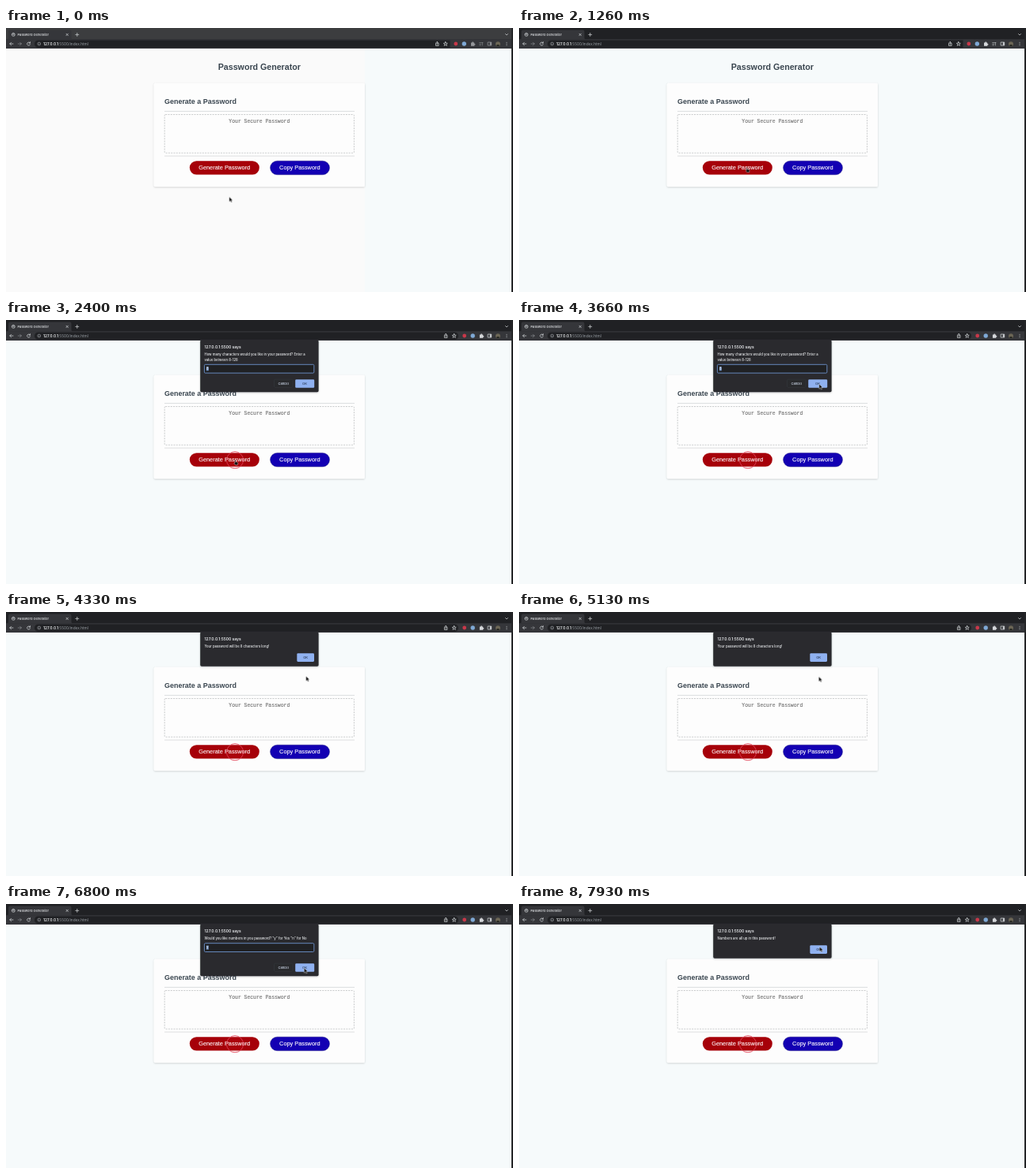
Write an HTML page that moves like this. It is 640 px wide and 334 px high and loops after 8000 ms.

```html
<!DOCTYPE html>
<html lang="en">
<head>
<meta charset="utf-8">
<title>Password Generator</title>
<style>
html, body { margin: 0; width: 100%; height: 100%; overflow: hidden; background: #f6fafb; }
svg { display: block; width: 100%; height: 100%; }
text { font-family: Inter, "Open Sans", sans-serif; white-space: pre; }
.page text { font-family: "Liberation Sans", Arial, sans-serif; text-anchor: middle; }
.page .head { font-weight: bold; fill: #3a4650; }
.page .mono { font: 6.42px "Liberation Mono", monospace; fill: #707070; stroke: #707070; stroke-width: .12; }
.page .label { font-size: 7.35px; fill: #fff; stroke: #fff; stroke-width: .12; }
.says { font-size: 4.95px; font-weight: 600; fill: #e8eaed; }
.msg { font-size: 4.24px; font-weight: 500; fill: #eceef0; }
.btn { font-size: 4px; font-weight: 500; text-anchor: middle; }
.line { fill: none; stroke: #c6c9cc; stroke-width: .8; stroke-linecap: round; stroke-linejoin: round; }

/* Hard switches */
.stale, .wide, .slim, .d1, .d2, .d3, .d4, .hover, .arrow, .hand {
  animation: 8s step-end infinite;
}
.stale { animation-name: stale; }
.wide { animation-name: wide; }
.slim { animation-name: slim; }
.d1 { animation-name: d1; }
.d2 { animation-name: d2; }
.d3 { animation-name: d3; }
.d4 { animation-name: d4; }
.hover { animation-name: hover; }
.arrow { animation-name: arrow; }
.hand { animation-name: hand; }
@keyframes stale { 0% { opacity: 1 } 13%, 100% { opacity: 0 } }
@keyframes wide { 0% { opacity: 1 } 25%, 100% { opacity: 0 } }
@keyframes slim { 0% { opacity: 0 } 25%, 100% { opacity: 1 } }
@keyframes d1 { 0% { opacity: 0 } 26% { opacity: 1 } 53%, 100% { opacity: 0 } }
@keyframes d2 { 0% { opacity: 0 } 53% { opacity: 1 } 76%, 100% { opacity: 0 } }
@keyframes d3 { 0% { opacity: 0 } 76% { opacity: 1 } 89%, 100% { opacity: 0 } }
@keyframes d4 { 0% { opacity: 0 } 89%, 100% { opacity: 1 } }
@keyframes hover {
  0% { opacity: 0 } 40.5% { opacity: .12 } 53% { opacity: 0 }
  71.5% { opacity: .12 } 76% { opacity: 0 } 80.5% { opacity: .12 }
  89% { opacity: 0 } 95%, 100% { opacity: .12 }
}
@keyframes arrow { 0% { opacity: 1 } 6.5% { opacity: 0 } 35%, 100% { opacity: 1 } }
@keyframes hand { 0% { opacity: 0 } 6.5% { opacity: 1 } 35%, 100% { opacity: 0 } }

.cursor { animation: move 8s ease-in-out infinite; }
@keyframes move {
  0%, 1% { transform: translate(281.7px, 213.6px) }
  9.5%, 16% { transform: translate(287.2px, 176.2px) }
  21%, 33.5% { transform: translate(288.9px, 177px) }
  42%, 53% { transform: translate(378.8px, 80.9px) }
  56%, 67.5% { transform: translate(378.4px, 81.7px) }
  73%, 77% { transform: translate(378px, 54.8px) }
  82.5%, 90% { transform: translate(376.4px, 80.9px) }
  97%, 100% { transform: translate(379.4px, 54px) }
}
</style>
</head>
<body>
<svg viewBox="0 0 640 334" preserveAspectRatio="none">
  <defs>
    <filter id="shadow" x="-10%" y="-10%" width="120%" height="125%">
      <feDropShadow dx="0" dy=".8" stdDeviation="1.1" flood-color="#000" flood-opacity=".18"/>
    </filter>
    <filter id="deep" x="-10%" y="-20%" width="120%" height="150%">
      <feDropShadow dx="0" dy=".6" stdDeviation="1.1" flood-color="#000" flood-opacity=".25"/>
    </filter>
    <g id="field">
      <rect x="250.4" y="56.3" width="138.4" height="10.8" rx="1.2" fill="#202124" stroke="#6c92cc" stroke-width=".9"/>
      <rect x="252.9" y="59.2" width="2.9" height="5" fill="#6f90c0"/>
    </g>
    <g id="choices">
      <rect x="338.5" y="75.2" width="23.2" height="10.2" rx="1.3" fill="#292a2d" stroke="#3c4045" stroke-width=".4"/>
      <text class="btn" x="350.1" y="81.6" fill="#d5e0f2">Cancel</text>
      <rect x="365.2" y="75.2" width="24" height="10.6" rx="1.3" fill="#8fb1f0"/>
      <text class="btn" x="377" y="81.7" fill="#26354f">OK</text>
      <rect class="hover" x="365.2" y="75.2" width="24" height="10.6" rx="1.3" fill="#123"/>
    </g>
    <g id="confirm">
      <rect x="367.3" y="52.3" width="21.7" height="10.6" rx="1.3" fill="#8fb1f0"/>
      <text class="btn" x="378.1" y="59" fill="#26354f">OK</text>
      <rect class="hover" x="367.3" y="52.3" width="21.7" height="10.6" rx="1.3" fill="#123"/>
    </g>
    <g id="tall">
      <rect x="245.2" y="25.3" width="149.4" height="66" rx="1.8" fill="#292a2d" filter="url(#deep)"/>
      <text class="says" x="250.5" y="35.5">127.0.0.1:5500 says</text>
    </g>
    <g id="short">
      <rect x="245.2" y="25.3" width="149.4" height="43.5" rx="1.8" fill="#292a2d" filter="url(#deep)"/>
      <text class="says" x="250.5" y="35.5">127.0.0.1:5500 says</text>
    </g>
    <path id="share" class="line" d="M-1.1 -.7H-1.8V2.4H1.8V-.7H1.1M0 1V-2.6M-1.1 -1.6L0 -2.7L1.1 -1.6"/>
    <path id="star" class="line" d="M0 -2.5L.7 -.8L2.5 -.7L1.1 .5L1.6 2.3L0 1.3L-1.6 2.3L-1.1 .5L-2.5 -.7L-.7 -.8Z"/>
    <g id="tools">
      <use href="#share" x="-34" y="20"/>
      <use href="#star" x="-23.5" y="20"/>
      <circle cx="-10.5" cy="20" r="2.4" fill="#c9384a"/>
      <circle cx="0" cy="20" r="2.7" fill="#7fa9d6"/>
      <path d="M8.7 18.5H10.2V17.4H11.7V18.5H13V20H14V21.4H13V22.8H8.7Z" fill="#d5d7da"/>
    </g>
  </defs>

  <!-- Page -->
  <rect width="640" height="334" fill="#f6fafb"/>
  <rect class="stale" y="26" width="453" height="308" fill="#fafafa"/>
  <g class="page">
    <text class="head" x="319.8" y="53.2" font-size="10.65">Password Generator</text>
    <rect x="186.7" y="69.7" width="266.2" height="131" rx="1.7" fill="#fdfdfd" filter="url(#shadow)"/>
    <text class="head" x="245.5" y="95.6" font-size="8.95">Generate a Password</text>
    <path d="M200 105.4H440M200 162H440" stroke="#cfd1d3" stroke-width=".7"/>
    <rect x="200.2" y="109.5" width="239.2" height="48.6" rx="1" fill="none" stroke="#bdbfc1" stroke-width=".8" stroke-dasharray="2 1.3"/>
    <text class="mono" x="319.8" y="120.3">Your Secure Password</text>
    <rect x="231.8" y="168.2" width="88" height="17.2" rx="8.6" fill="#a60009"/>
    <text class="label" x="275.7" y="179.3">Generate Password</text>
    <rect x="333.6" y="168.2" width="74.8" height="17.4" rx="8.7" fill="#1300b3" stroke="#0c0080" stroke-width=".5"/>
    <text class="label" x="370.8" y="179.3">Copy Password</text>
  </g>
  <circle class="slim" cx="289" cy="177.2" r="10.6" fill="#f33" fill-opacity=".06" stroke="#e2485c" stroke-opacity=".85"/>

  <!-- Browser bar -->
  <rect width="640" height="26" fill="#202124"/>
  <rect class="stale" width="640" height="14.4" fill="#3c3d3f"/>
  <path d="M1 14.4Q3 14.4 3 12.2V4.5Q3 2.4 5 2.4H80.5Q82.5 2.4 82.5 4.5V12.2Q82.5 14.4 84.5 14.4Z" fill="#35363a"/>
  <rect y="14.2" width="640" height="11.8" fill="#35363a"/>
  <rect x="36" y="15.5" width="535" height="9.3" rx="4.6" fill="#202124"/>
  <circle cx="9.3" cy="8.4" r="2" fill="none" stroke="#c6c9cc" stroke-width=".7"/>
  <path class="line" d="M7.6 8H9.5L10.3 9.4M9 6.6L10.5 7.4"/>
  <text x="14.5" y="9.8" font-size="4.05" font-weight="500" fill="#e2e4e7">Password Generator</text>
  <path class="line" d="M76 7.2L78.4 9.6M78.4 7.2L76 9.6M87.8 8.4H91.8M89.8 6.4V10.4M630.5 7.5L632 9L633.5 7.5"/>
  <path class="line" d="M9 20H4.8M6.6 18.2L4.8 20L6.6 21.8"/>
  <path class="line" d="M15.2 20H19.4M17.6 18.2L19.4 20L17.6 21.8" opacity=".5"/>
  <path class="line" d="M30.2 18.8A2 2 0 1 0 30.5 20.8M30.5 17.6V19.1H29"/>
  <circle cx="41.8" cy="20" r="1.9" fill="none" stroke="#aeb1b5" stroke-width=".6"/>
  <path d="M41.8 19.7V21M41.8 18.7V19.1" stroke="#aeb1b5" stroke-width=".6"/>
  <text x="47" y="21.6" font-size="4.75" fill="#9aa0a6"><tspan font-weight="600" fill="#eceef0">127.0.0.1</tspan>:5500/index.html</text>
  <g class="wide">
    <rect x="560.5" y="14.5" width="14" height="11.5" fill="#35363a"/>
    <use href="#tools" x="578.3"/>
    <path class="line" d="M597.7 18.5H602M597.7 20.2H600M597.7 21.8H599.5M601.5 22V18.5" opacity=".7"/>
  </g>
  <g class="slim"><use href="#tools" x="589.2"/></g>
  <rect class="line" x="608.5" y="18" width="4.2" height="4"/>
  <rect x="610.8" y="18" width="2" height="4" fill="#c6c9cc"/>
  <circle cx="621" cy="20.2" r="3" fill="#6c6656"/>
  <path d="M618.7 22.1Q621 19.7 623.3 22.1Q621 24.3 618.7 22.1" fill="#22241f"/>
  <g fill="#c6c9cc">
    <circle cx="632" cy="18.2" r=".5"/><circle cx="632" cy="20" r=".5"/><circle cx="632" cy="21.8" r=".5"/>
  </g>
  <rect class="stale" x="582" y="15" width="34" height="10" fill="#35363a" fill-opacity=".4"/>
  <rect x="638" width="2" height="334" fill="#242527"/>

  <!-- Dialogs -->
  <g class="d1">
    <use href="#tall"/>
    <text class="msg" x="250.5" y="45.2">How many characters would you like in your password? Enter a</text>
    <text class="msg" x="250.5" y="51.8">value between 8-128</text>
    <use href="#field"/>
    <text class="msg" x="253.1" y="63.2">8</text>
    <use href="#choices"/>
  </g>
  <g class="d2">
    <use href="#short"/>
    <text class="msg" x="250.5" y="45.2">Your password will be 8 characters long!</text>
    <use href="#confirm"/>
  </g>
  <g class="d3">
    <use href="#tall"/>
    <text class="msg" x="250.5" y="45.2">Would you like numbers in you password? "y" for Yes "n" for No</text>
    <use href="#field" y="-6.6"/>
    <text class="msg" x="253.1" y="56.4">y</text>
    <use href="#choices"/>
  </g>
  <g class="d4">
    <use href="#short"/>
    <text class="msg" x="250.5" y="45.2">Numbers are all up in this password!</text>
    <use href="#confirm"/>
  </g>

  <!-- Pointer -->
  <g class="cursor" fill="#0a0a0a" stroke="#fff" stroke-width=".4" stroke-linejoin="round">
    <path class="arrow" d="M0 0V6.3L1.5 4.9L2.5 7.1L3.6 6.6L2.6 4.5H4.5Z"/>
    <path class="hand" d="M0 .4Q.6 -.3 1.1 .4V2.5L3.3 3Q4 3.2 3.9 4L3.4 6.4H.6L-1.2 4Q-.9 3.2 0 3.9Z"/>
  </g>
</svg>
</body>
</html>
```
